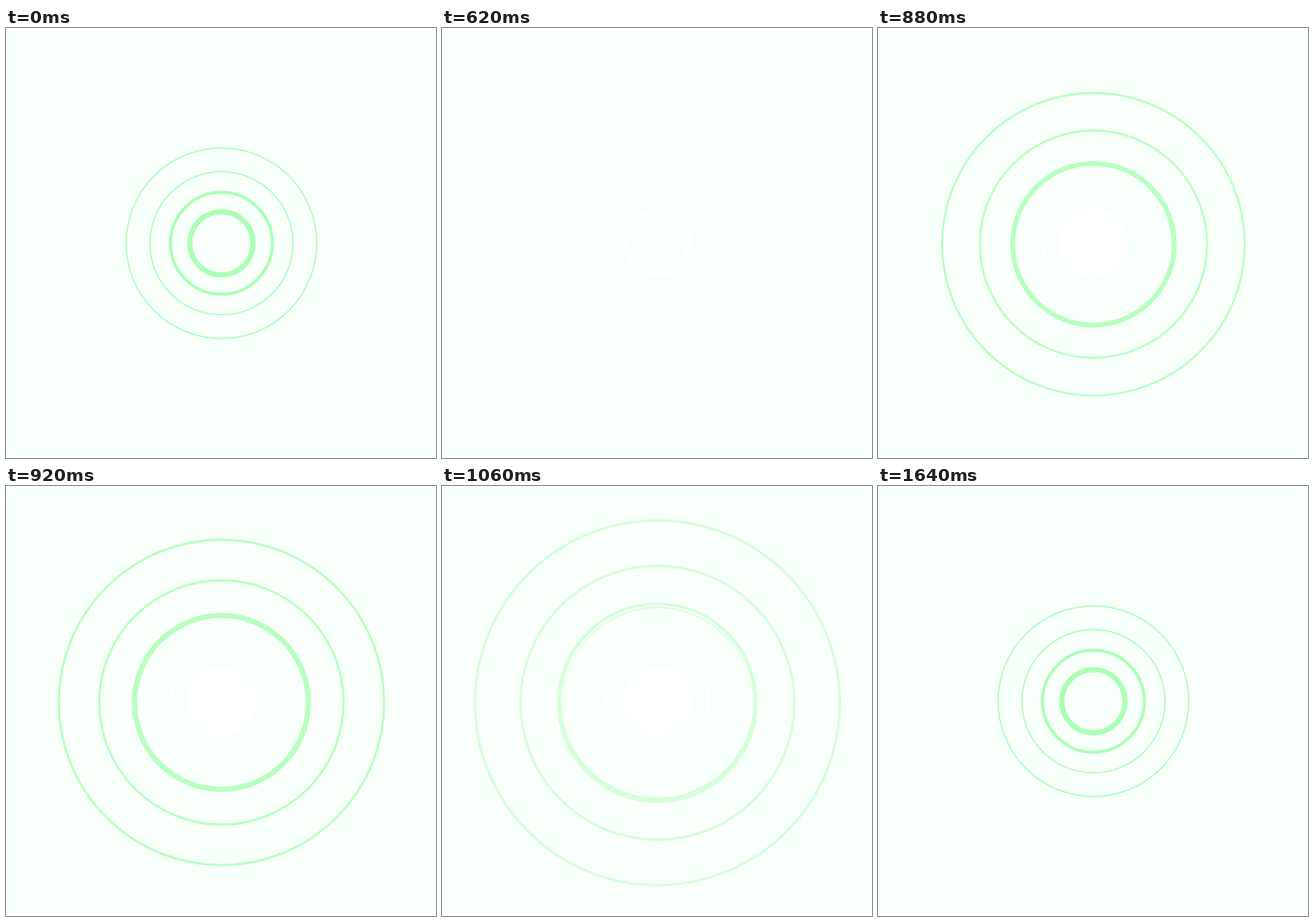
An HTML page with a canvas that plays this animation: 500 by 500 pixels, repeating every 1680 ms.

```html
<!DOCTYPE html>
<html lang="en">
<head>
<meta charset="utf-8">
<title>Ripple</title>
<style>
  html, body { margin: 0; width: 100%; height: 100%; overflow: hidden; background: #f9fffb; }
  canvas { display: block; width: 500px; height: 500px; }
</style>
</head>
<body>
<canvas id="stage" width="500" height="500"></canvas>
<script>
const ctx = document.getElementById('stage').getContext('2d');
const LOOP = 1680, STEP = 20;
const CX = 250.5, CY = 250.3;
const BACK = '#f9fffb', GREEN = '#aaffb4', WHITE = '#fff';

// Each ring is wiped clockwise between start and end, and comes back at "back".
const rings = [
  { r: 110.8, w: 1.5, start: 0,   end: 360, back: 1640 },
  { r: 83.2,  w: 1.5, start: 148, end: 540, back: 1580 },
  { r: 59.2,  w: 3.5, start: 243, end: 610, back: 1520 },
  { r: 36.8,  w: 6,   start: 375, end: 625, back: 1460 }
];

const clamp = x => Math.min(1, Math.max(0, x));
const progress = (t, a, b) => clamp((t - a) / (b - a));
const easeInOut = p => (1 - Math.cos(Math.PI * p)) / 2;
const easeOut = p => 1 - (1 - p) ** 3;

function arc(r, width, color, from = 0, to = 1, y = CY) {
  if (to <= from) return;
  const turn = f => (f * 2 - 0.5) * Math.PI;
  ctx.beginPath();
  ctx.arc(CX, y, r, turn(from), turn(to));
  ctx.lineWidth = width;
  ctx.strokeStyle = color;
  ctx.stroke();
}

function drawWipe(t) {
  rings.forEach(({ r, w, start, end }, i) => {
    const p = t >= 620 ? 1 : easeInOut(progress(t, start, end));
    if (i === 2) {
      arc(r + 1.6, 1, WHITE, 0, p);
      arc(r - 1.6, 1, WHITE, 0, p);
    } else if (i === 3) {
      arc(r, w, WHITE, 0, p);
    }
    arc(r, w, GREEN, p, 1);
  });
}

function drawRipple(t) {
  const scale = 1 + 0.94 * easeOut(progress(t, 760, 1190));
  ctx.globalAlpha = 0.83 * (1 - progress(t, 990, 1150));
  for (const { r, w } of rings.slice(0, 3)) {
    arc(r * scale, w * scale, GREEN, 0, 1, CY + (scale - 1) * 1.9);
  }
  ctx.globalAlpha = 1;
}

function drawTraces(t) {
  ctx.globalAlpha = 0.85;
  for (const { r, w, back } of rings.slice(0, 3)) {
    if (t < back) arc(r, w + 0.5, WHITE);
  }
  ctx.globalAlpha = 1;
  if (t < rings[3].back) {
    ctx.beginPath();
    ctx.arc(CX, CY, 40, 0, 2 * Math.PI);
    ctx.fillStyle = WHITE;
    ctx.fill();
  }
}

function draw(t) {
  ctx.fillStyle = BACK;
  ctx.fillRect(0, 0, 500, 500);
  if (t < 800) {
    drawWipe(t);
    return;
  }
  if (t < 1160) drawRipple(t);
  drawTraces(t);
  for (const { r, w, back } of rings) {
    if (t >= back) arc(r, w, GREEN);
  }
}

const origin = performance.now();
function tick() {
  const t = (performance.now() - origin) % LOOP;
  draw(Math.floor(t / STEP) * STEP);
  requestAnimationFrame(tick);
}
tick();
</script>
</body>
</html>
```
